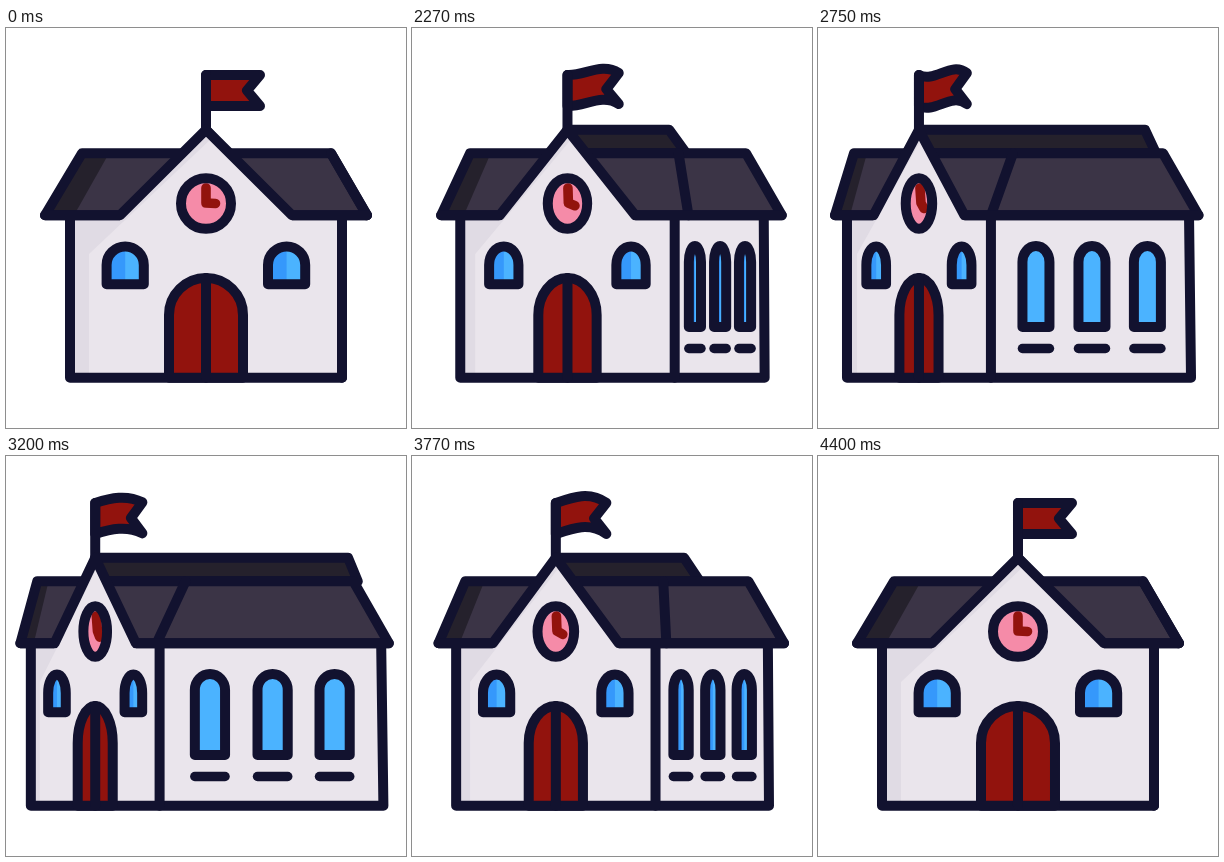
Recreate the animation shown at these times as an HTML page with a canvas. Size 400 by 400 pixels, loop 4430 ms.

```html
<!DOCTYPE html>
<html lang="en">
<head>
<meta charset="utf-8">
<title>School building</title>
<style>
  html, body { margin: 0; width: 100%; height: 100%; overflow: hidden; background: #fff; }
  canvas { display: block; width: 100vmin; height: 100vmin; }
</style>
</head>
<body>
<canvas id="stage"></canvas>
<script>
const LOOP = 4430, MOVE = 2030;
const INK = '#12122f', WALL = '#eae5ec', SHADE = '#e0dbe4', ROOF = '#3b3446', DARK = '#25212c';
const RED = '#92130d', PINK = '#f58ba8', BLUE = '#3598fb', SKY = '#4bb3ff';
const RIDGE = 101.8, TOP = 125.3, EAVE = 187.3, BASE = 349.8;

// time, turn, then the flag's inner lift, outer lift and tip lift
const STEPS = [
  [2015, 0, 0, 0, 0],
  [2270, .448, 1, -13, -2],
  [2450, .76, -9, -11, 0],
  [2540, .9, -5, -10, 0],
  [2750, 1, 8, -14, -2],
  [3090, 1.13, -14, -6, 1],
  [3300, 1.08, 3, -11, -2],
  [3590, .902, -12, -5, 2],
  [3920, .288, 0, -17, -2],
  [4190, .045, -4, -6, -1],
  [4430, 0, 0, 0, 0]
];

const canvas = document.getElementById('stage');
const ctx = canvas.getContext('2d');
const ratio = window.devicePixelRatio || 1;
canvas.width = canvas.height = 400 * ratio;
ctx.scale(ratio, ratio);
ctx.lineJoin = ctx.lineCap = 'round';

function slope(i, k) {
  const a = STEPS[i - 1], b = STEPS[i + 1];
  return a && b ? (b[k] - a[k]) / (b[0] - a[0]) : 0;
}

function sample(t, k) {
  if (t < MOVE) return 0;
  let i = 0;
  while (i < STEPS.length - 2 && t >= STEPS[i + 1][0]) i++;
  const a = STEPS[i], b = STEPS[i + 1], span = b[0] - a[0];
  const u = (t - a[0]) / span, v = 1 - u;
  return a[k] * (1 + 2 * u) * v * v + b[k] * u * u * (3 - 2 * u)
    + span * u * v * (slope(i, k) * v - slope(i + 1, k) * u);
}

function paint(fill, line, width = 10) {
  if (fill) { ctx.fillStyle = fill; ctx.fill(); }
  if (line) { ctx.strokeStyle = line; ctx.lineWidth = width; ctx.stroke(); }
}

function poly(points, fill, line, width) {
  ctx.beginPath();
  points.forEach(p => ctx.lineTo(p[0], p[1]));
  if (fill) ctx.closePath();
  paint(fill, line, width);
}

// Arched opening; the part left of the split is darker
function arch(x, half, top, rise, bottom, fill, left, split) {
  const trace = () => {
    ctx.beginPath();
    ctx.moveTo(x - half, bottom);
    ctx.lineTo(x - half, top + rise);
    ctx.ellipse(x, top + rise, half, rise, 0, Math.PI, 2 * Math.PI);
    ctx.lineTo(x + half, bottom);
    ctx.closePath();
  };
  trace();
  paint(fill);
  if (left) {
    ctx.save();
    ctx.clip();
    ctx.fillStyle = left;
    ctx.fillRect(x - half, top, Math.max(0, split - x + half), bottom - top);
    ctx.restore();
    trace();
  }
  paint(null, INK);
}

function drawFlag(x, s, t) {
  const a = sample(t, 2), b = sample(t, 3), d = sample(t, 4);
  const w = 54 - 13 * (1 - s);
  ctx.beginPath();
  ctx.moveTo(x, 47);
  ctx.bezierCurveTo(x + w / 3, 47 + a, x + w * 2 / 3, 47 + b, x + w, 47 + d);
  ctx.lineTo(x + w - 13 + 3 * (1 - s), 62.5 + d * .7);
  ctx.lineTo(x + w, 78 + d);
  ctx.bezierCurveTo(x + w * 2 / 3, 78 + b, x + w / 3, 78 + a, x, 78);
  ctx.closePath();
  paint(RED, INK);
  poly([[x, 47], [x, RIDGE]], null, INK);
}

function draw(t) {
  const p = Math.max(0, sample(t, 1));
  const left = 64 - 35 * p, corner = 336 - 163 * p, right = 336 + 37 * p;
  const cx = (left + corner) / 2, s = (corner - left) / 272;
  const at = x => cx + (x - 200) * s;
  const tipL = 39 - 22 * p, topL = 76 - 40 * p, tipR = 361 + 19.5 * p, topR = 325 + 20 * p;
  const gl = at(114), gr = at(286), side = right - corner, rightTop = right - 2 * p;

  ctx.fillStyle = '#fff';
  ctx.fillRect(0, 0, 400, 400);

  drawFlag(cx, s, t);
  poly([[cx, RIDGE], [200 + 127 * p, RIDGE], [222 + 116 * p, TOP], [cx, TOP]], DARK, INK);

  // side wall
  poly([[corner, EAVE], [rightTop, EAVE], [right, BASE], [corner, BASE]], WALL);
  for (const f of [.225, .505, .782]) {
    const x = corner + side * f, half = side * .0675;
    const inner = Math.max(0, half - 5);
    const tint = Math.min(.5, Math.max(0, 1 - p) * 3.5);
    arch(x, half, 218, 16, 299, SKY, BLUE, tint ? x - inner + 2 * inner * tint : 0);
    poly([[x - half, 320.5], [x + half, 320.5]], null, INK, 9.5);
  }
  poly([[rightTop, EAVE], [right, BASE], [corner, BASE]], null, INK);

  // front wall
  poly([[left, EAVE], [corner, EAVE], [corner, BASE], [left, BASE]], WALL);
  poly([[left, EAVE], [at(124), EAVE], [at(83), 226], [at(83), BASE], [left, BASE]], SHADE);
  poly([[left, EAVE], [left, BASE], [corner, BASE], [corner, EAVE]], null, INK);

  // roof
  const outline = [[topL, TOP], [topR, TOP], [tipR, EAVE], [tipL, EAVE]];
  const band = 27 - 14 * p;
  poly(outline, ROOF);
  poly([[topL, TOP], [topL + band, TOP], [tipL + band + 2, EAVE], [tipL, EAVE]], DARK);
  poly(outline, 'transparent', INK);
  poly([[325 - 130 * p, TOP], [361 - 188 * p, EAVE]], null, INK);

  // gable
  poly([[gl, EAVE], [cx, RIDGE], [gr, EAVE], [gr, 194], [gl, 194]], WALL);
  poly([[cx, RIDGE], [gl, EAVE], [gl, 194], [at(117), 194], [at(207), 109]], SHADE);
  poly([[tipL, EAVE], [gl, EAVE], [cx, RIDGE], [gr, EAVE], [tipR, EAVE]], null, INK);

  // clock
  const dial = () => {
    ctx.beginPath();
    ctx.ellipse(cx, 175.5, 25 * s, 25.3, 0, 0, 2 * Math.PI);
  };
  dial();
  paint(PINK);
  poly([[cx + p, 160], [cx + 2 * p, 175], [at(209.5), 175.5 + 5 * p]], null, RED, 9.6);
  dial();
  paint(null, INK);

  for (const x of [119.2, 280.6]) arch(at(x), 18.6 * s, 218.5, 18.5, 256.3, SKY, BLUE, at(x));
  arch(cx, 37 * s, 250, 37, BASE, RED);
  poly([[cx, 250], [cx, BASE]], null, INK);
}

const start = performance.now();
function tick() {
  draw((performance.now() - start) % LOOP);
  requestAnimationFrame(tick);
}
tick();
</script>
</body>
</html>
```
